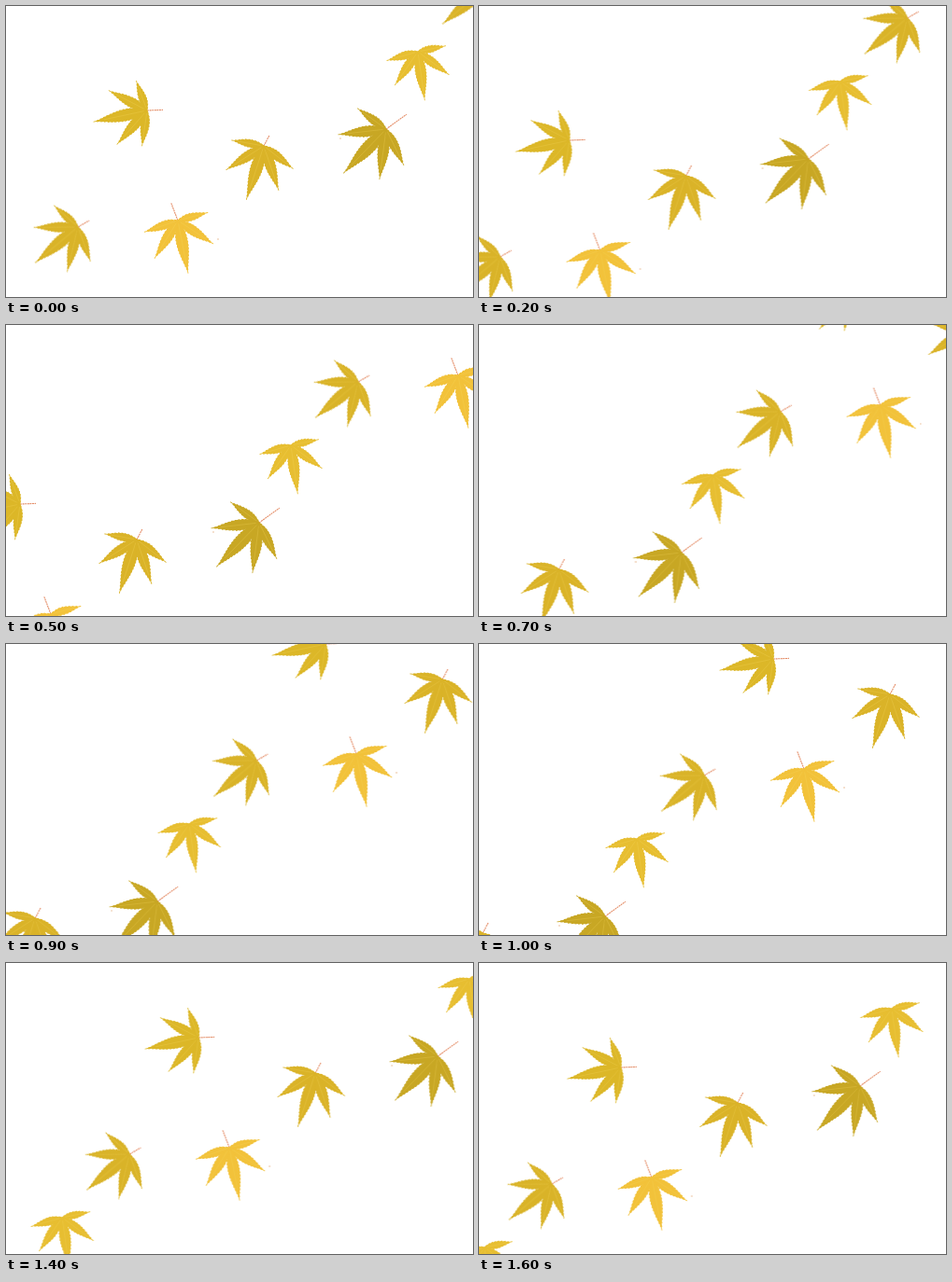
Recreate the animation shown at these times as an HTML page. Size 500x312 px, loop 1700 ms.

```html
<!DOCTYPE html>
<html lang="en">
<head>
<meta charset="utf-8">
<title>Drifting leaves</title>
<style>
  html, body { margin: 0; width: 100%; height: 100%; overflow: hidden; background: #fff; }
  svg { display: block; width: 500px; height: 312px; }
  #drift { animation: drift 1.7s steps(17, end) infinite; }
  @keyframes drift {
    to { transform: translate(-462.4px, 272px); }
  }
  .stem { stroke: #e48c66; stroke-width: 1.1; stroke-dasharray: 2 .6; }
  .vein { stroke: #f6d862; stroke-width: .6; opacity: .4; }
  .speck { fill: #e2a878; }
</style>
</head>
<body>
<svg viewBox="0 0 500 312">
  <g id="drift">
    <g id="leaves"></g>
    <use href="#leaves" x="436" y="-256"/>
  </g>
</svg>
<script>
  const root = document.getElementById('leaves');

  function add(parent, tag, attrs) {
    const el = document.createElementNS('http://www.w3.org/2000/svg', tag);
    for (const key in attrs) el.setAttribute(key, attrs[key]);
    return parent.appendChild(el);
  }

  // A tapering lobe along the x axis, with saw teeth that point towards its tip
  function lobe(len) {
    const wide = 1.3 + len * .088, teeth = Math.round(len / 3.6);
    const upper = [], lower = [];
    for (let i = 0; i < teeth; i++) {
      for (const [step, bump] of [[0, -.4], [.85, .4]]) {
        const t = (i + step) / teeth;
        const w = Math.max(.4, 4.66 * wide * t ** .9 * (1 - t) ** 1.4 + bump);
        upper.push([len * t, w]);
        lower.unshift([len * t, -w]);
      }
    }
    return 'M' + [...upper, [len, 0], ...lower].join('L') + 'Z';
  }

  // Five lobes fan out from (x, y); the longest points in the direction turn
  function leaf({ x, y, turn, size, stem, color, flip }) {
    const g = add(root, 'g', {
      transform: `translate(${x} ${y}) rotate(${turn}) scale(1 ${flip ? -1 : 1})`
    });
    const spread = flip ? 44 : 38;
    add(g, 'path', { class: 'stem', d: `M0 0H${stem}`, transform: 'rotate(190)' });
    add(g, 'circle', { cx: 4, r: 4.5, fill: color });
    for (let k = -2; k <= 2; k++) {
      const len = size * (1 - .19 * Math.abs(k) + .02 * k);
      const arm = add(g, 'g', { transform: `rotate(${1.5 * k * k - spread * k})` });
      add(arm, 'path', { d: lobe(len), fill: color });
      add(arm, 'path', { class: 'vein', d: `M3 0H${len * .8}` });
    }
  }

  [
    { x: 151, y: 112, turn: 168, size: 59, stem: 17, color: '#dcb728' },
    { x: 276, y: 150, turn: 108, size: 61, stem: 13, color: '#dab328' },
    { x: 184, y: 230, turn: 79, size: 58, stem: 20, color: '#f2c23a', flip: true },
    { x: 407, y: 132, turn: 134, size: 66, stem: 27, color: '#c8a724' },
    { x: 441, y: 49, turn: 82, size: 53, stem: 0, color: '#e7be31', flip: true },
    { x: 77, y: 237, turn: 140, size: 60, stem: 14, color: '#d9b328' }
  ].forEach(leaf);

  for (const [cx, cy] of [[227, 250], [358, 142]]) {
    add(root, 'circle', { class: 'speck', cx, cy, r: .7 });
  }
</script>
</body>
</html>
```
